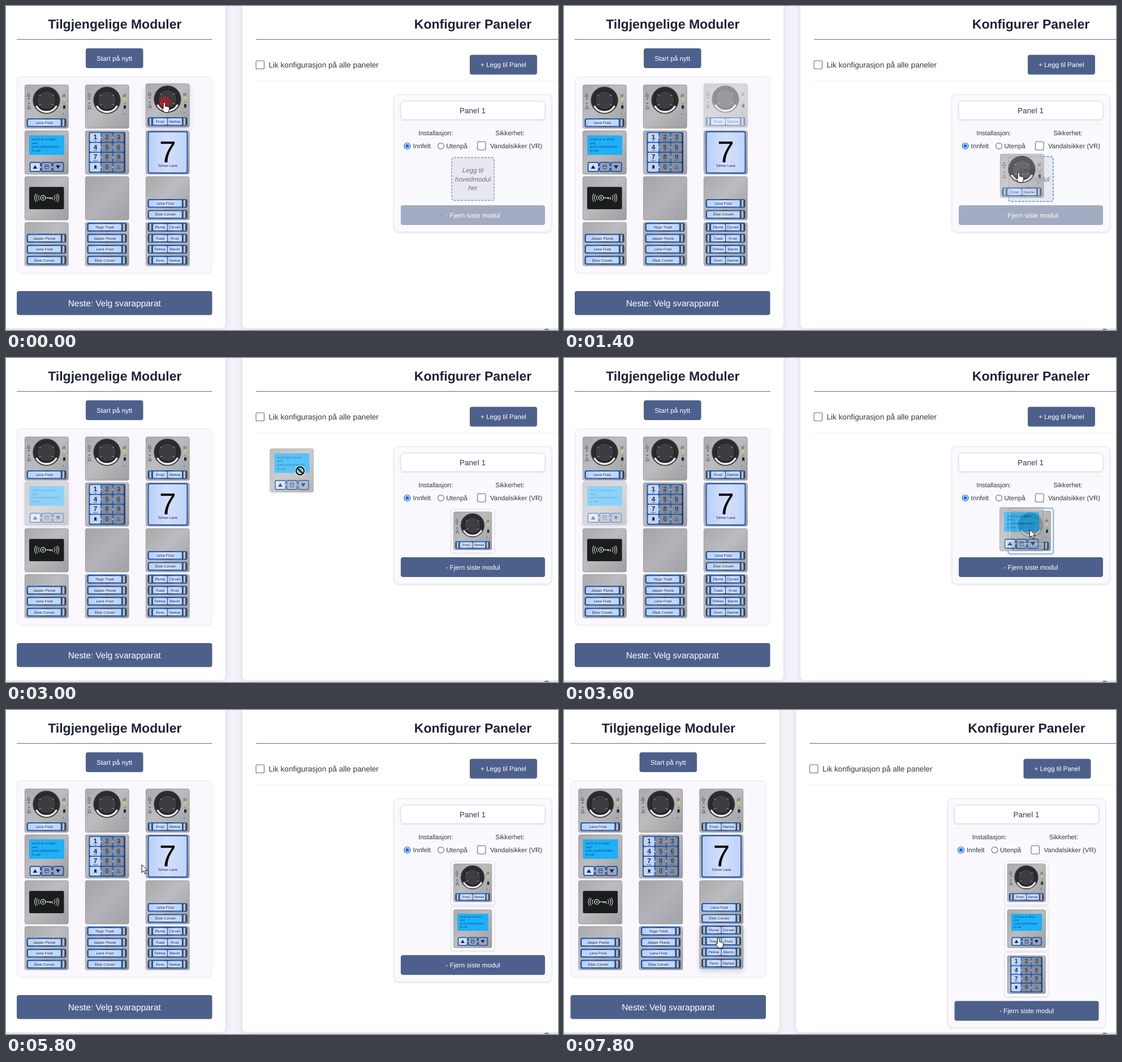
These frames come from a looping animation (976 px wide and 574 px high, 8 s). An HTML page:

```html
<!DOCTYPE html>
<html lang="no">
<head>
<meta charset="utf-8">
<title>Konfigurer paneler</title>
<style>
  html, body { margin: 0; width: 100%; height: 100%; overflow: hidden; background: #f3f2f9; }
  svg {
    display: block; width: 976px; height: 574px;
    font-family: "Liberation Sans", Arial, sans-serif; text-rendering: geometricPrecision;
  }
</style>
</head>
<body>
<svg viewBox="0 0 976 574">
  <defs>
    <linearGradient id="metal" x2="1" y2="1">
      <stop stop-color="#aaaaac"/><stop offset=".45" stop-color="#bcbcbe"/><stop offset="1" stop-color="#9d9ea1"/>
    </linearGradient>
    <linearGradient id="steel" x2="1" y2="1">
      <stop stop-color="#a4a5aa"/><stop offset=".5" stop-color="#b2b2b8"/><stop offset="1" stop-color="#a1a2a8"/>
    </linearGradient>
    <linearGradient id="blue">
      <stop stop-color="#1a4f9c"/><stop offset=".25" stop-color="#1f66c8"/><stop offset=".5" stop-color="#21498a"/>
      <stop offset=".8" stop-color="#1f66c8"/><stop offset="1" stop-color="#1c4178"/>
    </linearGradient>
    <linearGradient id="pale">
      <stop stop-color="#b9cff8"/><stop offset=".5" stop-color="#d3e0fc"/><stop offset="1" stop-color="#bfd3f9"/>
    </linearGradient>
    <filter id="card" x="-10%" y="-10%" width="120%" height="120%">
      <feDropShadow dx="0" dy="2" stdDeviation="4" flood-color="#303050" flood-opacity=".13"/>
    </filter>
    <filter id="soft" x="-10%" y="-20%" width="120%" height="150%">
      <feDropShadow dx="0" dy="1" stdDeviation="1.5" flood-color="#303050" flood-opacity=".14"/>
    </filter>
    <filter id="lift" x="-20%" y="-20%" width="140%" height="150%">
      <feDropShadow dx="0" dy="4" stdDeviation="4" flood-color="#303050" flood-opacity=".2"/>
    </filter>
    <g id="modules"></g>
  </defs>
  <g id="scene"></g>
</svg>
<script>
const LOOP = 8000, STEP = 200, SIZE = 77.5;
const INK = '#1e2235', BODY = '#343945', NAVY = '#4d608b';

const rect = (x, y, w, h, fill, rx = 0, more = '') =>
  `<rect x="${x}" y="${y}" width="${w}" height="${h}" fill="${fill}" rx="${rx}" ${more}/>`;
const circle = (x, y, r, fill, more = '') => `<circle cx="${x}" cy="${y}" r="${r}" fill="${fill}" ${more}/>`;
const path = (d, stroke, width = 1, fill = 'none') =>
  `<path d="${d}" fill="${fill}" stroke="${stroke}" stroke-width="${width}"/>`;
const text = (x, middle, size, str, fill = BODY, more = '') =>
  `<text x="${x}" y="${middle + size * .36}" font-size="${size}" fill="${fill}" ${more}>${str}</text>`;
const centred = (x, middle, size, str, fill, more = '') =>
  text(x, middle, size, str, fill, 'text-anchor="middle" ' + more);
const group = (content, attrs) => `<g ${attrs}>${content}</g>`;
const move = (x, y, content, scale = 1) => group(content, `transform="translate(${x} ${y}) scale(${scale})"`);

// Door station modules, each drawn in a square of SIZE
const base = fill => rect(.3, .3, SIZE - .6, SIZE - .6, `url(#${fill})`, 3, 'stroke="#88898c" stroke-width=".7"');
const bell = (x, y) => path(`M${x - 3} ${y + 2.5}h6l-1.5-2q0-3.5-1.5-3.5t-1.5 3.5z`, '#33363c', .7);
const door = (x, y) => path(`M${x - 2} ${y - 3.5}h4v7l-2-2-2 2z`, 'none', 0, '#25282e');

function speaker() {
  return circle(38.5, 27.5, 24, '#2b2c2f', 'stroke="#6c6d70" stroke-width=".8"')
    + circle(38.5, 27.5, 16.5, '#3c3d40', 'stroke="#1c1d1f" stroke-width="1.2"')
    + path('M25 18l4 1M52 18l-4 1M25 36l5-1.500M52 36l-5-1.500', '#a0a2a5', .9)
    + path('M20.500 37.500A20.500 20.500 0 0 0 56.500 37.500', '#f0f0f2', 3.4)
    + bell(7, 18) + circle(7.5, 24.5, 1.6, '#e2352d') + circle(7.5, 33, 1.6, '#2f83dd') + bell(7.5, 40)
    + path('M67.5 17v5M70 16v6M72 18l-2 3', '#33363c', .7) + circle(70, 25.5, 2, '#ead33c')
    + circle(70, 33.5, 2, '#54c95d') + door(70, 40) + circle(68, 51.5, .8, '#333');
}

function plate(middle, first, second) {
  const bar = x => rect(x, middle - 6.2, 7, 12.4, '#39445a') + rect(x + 1.7, middle - 6.2, 3.6, 12.4, '#b9bcc2');
  const label = (x, w, str) => rect(x, middle - 5.7, w, 11.4, 'url(#pale)', 1.3)
    + centred(x + w / 2, middle, 6.4, str, '#22283a');
  return rect(3.5, middle - 7.8, 70, 15.6, 'url(#blue)', 3.5) + bar(65)
    + (second ? bar(4.8) + label(13, 25, first) + label(39, 25, second) : label(5.8, 58, first));
}
const plates = rows => rows.map((row, i) => plate(67.3 - 19.5 * (rows.length - 1 - i), ...row)).join('');

function display() {
  const lines = ['scroll up or down', 'and', 'push central button', 'to call'];
  const button = i => rect(9.5 + 20.3 * i, 56.5, 18.5, 16, i ? '#98a5bd' : '#d0dffb', 2.5, 'stroke="#1d519f" stroke-width="1.8"');
  return rect(8, 8.5, 62, 34.5, '#1eb0f8')
    + lines.map((line, i) => text(13, 15 + 6.8 * i, 5.7, line, '#0c4c7e')).join('')
    + [0, 1, 2].map(button).join('')
    + path('M14.500 67.500l4-6.500 4 6.500zM55 61.500l4 6.500 4-6.500z', 'none', 0, '#1d2536')
    + path('M36 61h6v7h-6zM36 63.500h6', '#344262', 1)
    + circle(28.8, 64.5, 1.2, '#dce9ff') + circle(49.1, 64.5, 1.2, '#dce9ff');
}

function keypad() {
  const letters = ['QZ', 'ABC', 'DEF', 'GHI', 'JKL', 'MNO', 'PQRS', 'TUV', 'WXYZ'];
  let keys = rect(6.5, 2.5, 64.5, 72.5, 'url(#blue)', 3);
  for (let i = 0; i < 12; i++) {
    const col = i % 3, row = (i - col) / 3, x = 8.3 + 20.5 * col, y = 4.2 + 17.6 * row, mid = x + 9.8;
    keys += rect(x, y, 19, 15.8, col ? '#868d9b' : '#c4d6f6', 2);
    const ink = col ? '#36435e' : '#20283a';
    if (i === 9) keys += door(mid, y + 8);
    else if (i === 11) keys += bell(mid, y + 8);
    else keys += centred(mid, y + 6.8, 11.8, i === 10 ? 0 : i + 1, ink, 'font-weight="bold"')
      + (i < 9 ? centred(mid, y + 13.6, 3.2, letters[i], ink) : '');
    if (col) keys += circle(x - .7, y + 8, 1.1, '#d9e8ff');
  }
  return keys;
}

const houseNumber = () => rect(4.5, 2, 69, 73, 'url(#pale)', 3, 'stroke="#1f57ab" stroke-width="2"')
  + centred(39, 36.800, 53.5, '7', '#050608') + centred(38.8, 61.6, 6.3, 'Tolmer Lane', '#22283a');

const reader = () => rect(8, 18.5, 61.5, 39.5, '#1b1c1e', 2)
  + circle(32.5, 38, 4.3, 'none', 'stroke="#e8e8e8" stroke-width="1.2"') + circle(32.5, 38, 1.9, '#43c95a')
  + path('M37 38h12v3M45 38v2.5', '#e8e8e8', 1.2)
  + path('M26 34q-3 4 0 8M23 32q-4.500 6 0 12M20 30.500q-5 7.500 0 15M52 34q3 4 0 8M55 32q4.500 6 0 12M58 30.500q5 7.500 0 15', '#cfcfcf', 1.1);

const FROST = ['Lena Frost'], CORVEN = ['Elsie Corven'], PLUME = ['Jasper Plume'], TRASK = ['Hugo Trask'];
const designs = [
  speaker() + plates([FROST]), speaker(), speaker() + plates([['Frost', 'Harlow']]),
  display(), keypad(), houseNumber(),
  reader(), '', plates([FROST, CORVEN]),
  plates([PLUME, FROST, CORVEN]), plates([TRASK, PLUME, FROST, CORVEN]),
  plates([['Plume', 'Corven'], ['Trask', 'Frost'], ['Pellow', 'Marrin'], ['Fenn', 'Harlow']])
];
document.getElementById('modules').innerHTML = designs
  .map((art, i) => group(base(i === 7 ? 'steel' : 'metal') + art, `id="module${i}"`)).join('');

const moduleAt = (i, x, y, scale) => move(x, y, `<use href="#module${i}"/>`, scale);
const home = i => ({ x: 33 + 107 * (i % 3), y: 139.5 + 81.2 * Math.floor(i / 3) });

// Pointer route: time, x, y
const route = [
  [0, 280, 171], [200, 300, 160], [400, 400, 115], [600, 520, 96], [800, 640, 130], [1000, 740, 220],
  [1200, 795, 285], [1400, 804, 295], [1600, 804, 295], [1800, 700, 270], [2200, 170, 240], [2400, 86, 259],
  [2600, 167, 231], [2800, 330, 192], [3000, 520, 200], [3400, 800, 290], [3600, 823.5, 304],
  [4600, 826, 307], [4800, 826, 307], [5000, 760, 300], [5400, 430, 270], [5800, 240, 274],
  [6000, 212, 271], [6400, 197, 266], [6800, 197, 266], [7000, 400, 240], [7200, 780, 300],
  [7400, 820, 310], [7800, 273, 404]
];
const drags = [
  { module: 2, from: 0, to: 1600, grab: [33, 33] },
  { module: 3, from: 2600, to: 3800, grab: [53.5, 39.5] },
  { module: 4, from: 6800, to: 7400, grab: [57, 47] }
];
const clicks = [[-100, 281, 171], [2400, 86, 259], [6775, 197, 266]];

function pointerAt(t) {
  const next = route.findIndex(point => point[0] > t);
  if (next < 0) return route.at(-1).slice(1);
  const [t0, x0, y0] = route[next - 1], [t1, x1, y1] = route[next], k = (t - t0) / (t1 - t0);
  return [x0 + (x1 - x0) * k, y0 + (y1 - y0) * k];
}

const cursors = {
  hand: path('M-1.800 1q1.800-2.400 3.600 0v6l1.200-.6 2 .9 1.600.1 2 1.200v4l-1.600 5h-7l-4.600-6.500q0-2 2.800-.6z', '#111', 1, '#fff'),
  arrow: path('M0 0v14l3.300-3 2.400 5.400 2.400-1-2.400-5.300h4.600z', '#111', 1, '#fff'),
  denied: circle(0, 0, 7, 'none', 'stroke="#fff" stroke-width="4.500"') + circle(0, 0, 7, 'none', 'stroke="#111" stroke-width="2.400"')
    + path('M-5-5L5 5', '#111', 2.4)
};

const button = (x, y, w, h, label, size = 11.7, fill = NAVY) =>
  rect(x, y, w, h, fill, 4) + centred(x + w / 2, y + h / 2, size, label, '#fff');
const checkbox = (x, y) => rect(x, y, 14.5, 14.5, '#fff', 2, 'stroke="#6b6b70" stroke-width="1.1"');
const line = (x, y, w, fill) => rect(x, y, w, 1, fill);

const page = rect(-20, -20, 408, 591, '#fff', 8, 'filter="url(#card)"')
  + rect(418, -20, 600, 591, '#fff', 8, 'filter="url(#card)"')
  + centred(192.3, 32, 23.04, 'Tilgjengelige Moduler', INK, 'font-weight="bold"')
  + centred(825.5, 32, 23.04, 'Konfigurer Paneler', INK, 'font-weight="bold"')
  + line(19, 58.7, 345.5, '#5a5c66') + line(442, 58.7, 600, '#5a5c66') + line(442, 132.7, 600, '#ececf1')
  + button(141, 75, 101.5, 35, 'Start på nytt')
  + button(820, 86.5, 119, 35, '+ Legg til Panel')
  + button(19, 505, 345.5, 42.5, 'Neste: Velg svarapparat', 15.36)
  + checkbox(442, 97) + text(464.5, 104, 13.55, 'Lik konfigurasjon på alle paneler')
  + rect(19.5, 125.5, 344.5, 348, '#faf8fe', 7, 'stroke="#e6e5ee"');

function panel(count, over) {
  const extra = 81.2 * Math.max(0, count - 1);
  let out = rect(686, 157, 279, 243.3 + extra, '#faf9fe', 8, 'stroke="#e5e3ef" filter="url(#soft)"')
    + rect(698, 169, 255, 32, '#fff', 5, 'stroke="#dcdce4" filter="url(#soft)"')
    + centred(825, 185, 13.6, 'Panel 1') + line(698, 208.5, 255, '#f0eff5')
    + centred(759.7, 224.5, 11.55, 'Installasjon:') + centred(891, 224.5, 11.55, 'Sikkerhet:')
    + circle(709.5, 248, 5.4, '#fff', 'stroke="#2270e0" stroke-width="1.400"') + circle(709.5, 248, 3.3, '#2270e0')
    + text(719.5, 248, 11.55, 'Innfelt')
    + circle(769, 248, 5.4, '#fff', 'stroke="#6b6b70" stroke-width="1.100"') + text(778.5, 248, 11.55, 'Utenpå')
    + checkbox(833.5, 240.5) + text(856, 248, 11.55, 'Vandalsikker (VR)');
  const zoom = (content, y) => move(825.2, y + 38.5, move(-825.2, -y - 38.5, content), 1.05);
  if (!count) {
    const empty = rect(788, 268.5, 75, 76, '#e9e8f0', 4,
      `stroke="${over ? '#6ba2dd' : '#a9a9b3'}" stroke-width="1.800" stroke-dasharray="4 2"`)
      + ['Legg til', 'hovedmodul', 'her'].map((word, i) =>
        centred(825.5, 291 + 15.5 * i, 11.55, word, '#70717c', 'font-style="italic"')).join('');
    out += over ? zoom(empty, 268) : empty;
  }
  for (let i = 0; i < count; i++) {
    const y = 268 + 81.2 * i, lit = over && i === 0;
    const slot = rect(787.2, y, 76, 77, '#fff', 4,
      `stroke="${lit ? '#8bb6ec' : '#e2e1ea'}" stroke-width="${lit ? 2 : 1}" filter="url(#soft)"`)
      + moduleAt(drags[i].module, 791.2, y + 4.3, .877);
    out += lit ? zoom(slot, y) : slot;
  }
  return out + button(698, 353 + extra, 255, 35, '- Fjern siste modul', 11.7, count ? NAVY : '#a2abc1');
}

function render(t) {
  const [px, py] = pointerAt(t);
  const count = drags.filter(drag => drag.to <= t).length;
  const shift = count === 3 ? -7.5 : 0;
  const held = drags.find(drag => drag.from <= t && t < drag.to);
  const dragging = held && t > held.from;
  const inside = i => {
    const { x, y } = home(i);
    return px > x + shift && px < x + shift + SIZE && py > y && py < y + SIZE;
  };
  const under = designs.findIndex((_, i) => inside(i));
  const hover = held ? held.module : under;
  const over = dragging && px > 770 && px < 880 && py > 265;

  const shelf = designs.map((_, i) => {
    const { x, y } = home(i);
    if (i !== hover) return moduleAt(i, x, y);
    return group(moduleAt(i, x, y - 2), `filter="url(#lift)" opacity="${dragging ? .5 : 1}"`);
  }).join('');
  const ripples = clicks.map(([start, x, y]) => {
    const age = t - start;
    return age >= 0 && age < 250 ? circle(x, y, 6 + .045 * age, '#d01822', `opacity="${.8 - .002 * age}"`) : '';
  }).join('');
  const ghost = dragging
    ? group(moduleAt(held.module, px - held.grab[0], py - held.grab[1]), 'opacity=".75"') : '';

  let cursor = under >= 0 ? 'hand' : 'arrow';
  if (held && under !== held.module) cursor = over ? (count ? 'arrow' : 'hand') : 'denied';

  document.getElementById('scene').innerHTML =
    move(shift, 0, page + shelf + panel(count, over))
    + `<ellipse cx="956" cy="573.500" rx="4" ry="2" fill="#85858a"/>`
    + ripples + ghost + move(px, py, cursors[cursor]);
}

let shown = -1;
function tick(now) {
  const t = Math.floor(now % LOOP / STEP) * STEP;
  if (t !== shown) render(shown = t);
  requestAnimationFrame(tick);
}
tick(performance.now());
</script>
</body>
</html>
```
